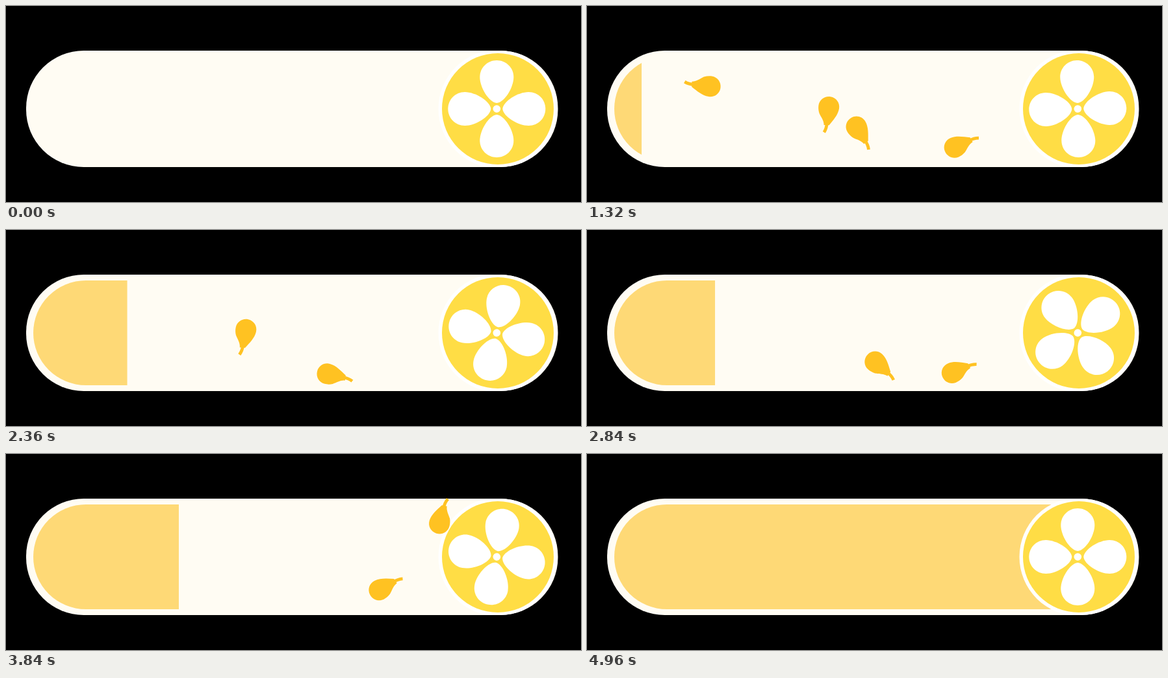
An HTML page with a canvas that plays this animation: 885 by 303 pixels, repeating every 5 s.

```html
<!DOCTYPE html>
<html lang="en">
<head>
<meta charset="utf-8">
<title>Leaf loading bar</title>
<style>
html, body { margin: 0; width: 100%; height: 100%; overflow: hidden; background: #000; }
canvas { display: block; }
</style>
</head>
<body>
<canvas id="stage" width="885" height="303"></canvas>
<script>
const ctx = document.getElementById('stage').getContext('2d');
const LOOP = 5000, STEP = 40;
const MID = 159, RAD = Math.PI / 180;
const LEAF_START = 720, LEAF_END = 66, LEAF_SPEED = 0.93;
const FAN_SPEED = 0.8527, FAN_TURNS = 11.5;

const bar = new Path2D();
bar.roundRect(31, 69, 818.5, 180, 88.7);
const track = new Path2D();
track.roundRect(42, 78, 760, 162, 81);
const leafBody = new Path2D('M-28 0C-28-9-21-16-12-16C-2-16 7-10 16-5L17 3C10 4 6 9 0 13C-4 15-8 16-12 16C-21 16-28 9-28 0Z');
const leafStem = new Path2D('M13-1Q21-2 28 1');
const petal = new Path2D('M0-9C-12-10-26-33-26-49C-26-64-14-75 0-75C14-75 26-64 26-49C26-33 12-10 0-9Z');

// Times at which the fan throws a leaf
const launches = [
  27, 346, 437, 737, 944, 998, 1166, 1501, 1549, 1980,
  2130, 2552, 2682, 2900, 3050, 3290, 3695, 3787, 4000, 4400
];

const clamp = (v, lo, hi) => Math.min(hi, Math.max(lo, v));
const ramp = (t, from, to) => clamp((t - from) / (to - from), 0, 1);

// Loading runs steadily, stalls, then rushes to the end
const fillEdge = t =>
  41.5 + 149 * ramp(t, 888, 2400) + 20 * ramp(t, 2400, 3745) + 505 * ramp(t, 3745, 4610);

function disc(x, y, r, color) {
  ctx.fillStyle = color;
  ctx.beginPath();
  ctx.arc(x, y, r, 0, 2 * Math.PI);
  ctx.fill();
}

function clipped(path, draw) {
  ctx.save();
  ctx.clip(path);
  draw();
  ctx.restore();
}

function drawLeaf(age) {
  const x = LEAF_START - LEAF_SPEED * age;
  if (x < LEAF_END || x > LEAF_START) return;
  const drop = 70 * ramp(x, 575, 670);
  const y = 170 + 56 * Math.cos((x - 519) / 290 * Math.PI) - drop;
  const flick = 24 * Math.exp(-(((x - 338) / 40) ** 2));
  ctx.save();
  ctx.translate(x, y);
  ctx.rotate((0.53 * (534 - x) + flick) * RAD);
  ctx.fillStyle = ctx.strokeStyle = '#ffc222';
  ctx.lineWidth = 4.8;
  ctx.fill(leafBody);
  ctx.stroke(leafStem);
  ctx.restore();
}

function drawFan(t) {
  const angle = clamp(FAN_SPEED * (t - 52), 0, 360 * FAN_TURNS);
  disc(757, MID, 86, '#ffdd45');
  ctx.save();
  ctx.translate(755.3, MID);
  ctx.rotate(-angle * RAD);
  disc(0, 0, 5.8, '#fff');
  for (let i = 0; i < 4; i++) {
    ctx.fill(petal);
    ctx.rotate(Math.PI / 2);
  }
  ctx.restore();
}

function render(now) {
  const t = Math.floor(now % LOOP / STEP) * STEP;
  const edge = fillEdge(t);
  ctx.clearRect(0, 0, 885, 303);
  ctx.fillStyle = '#fffcf3';
  ctx.fill(bar);

  clipped(track, () => {
    ctx.fillStyle = '#fed976';
    ctx.fillRect(0, 0, edge, 303);
  });
  clipped(bar, () => disc(757, MID, 91.5, '#fff'));

  const open = new Path2D();
  open.rect(edge, 0, 885, 303);
  clipped(open, () => launches.forEach(launch => drawLeaf(t - launch)));
  drawFan(t);
}

const start = performance.now();
function tick() {
  render(performance.now() - start);
  requestAnimationFrame(tick);
}
tick();
</script>
</body>
</html>
```
